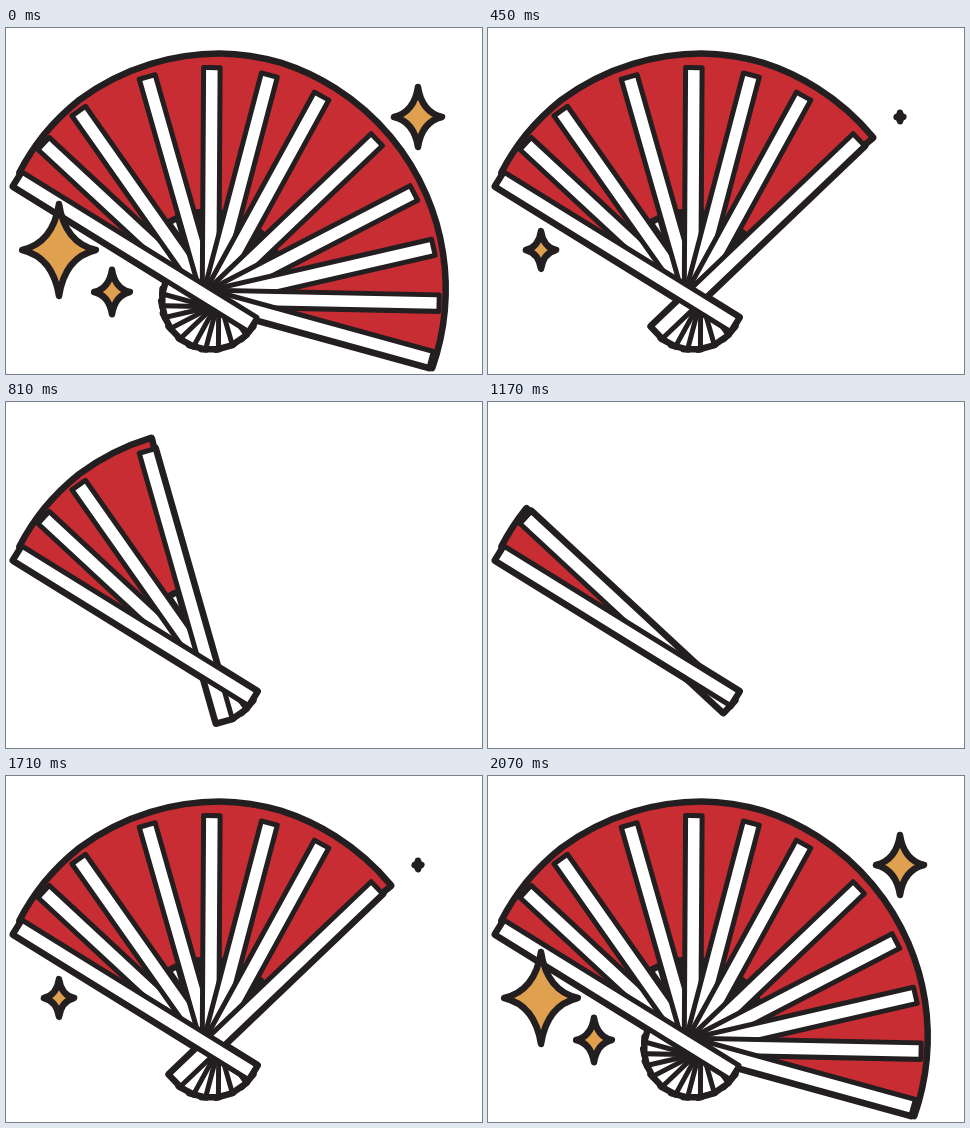
Recreate the animation shown at these times as an HTML page. Size 476 by 346 pixels, loop 2.16 s.

```html
<!DOCTYPE html>
<html lang="en">
<head>
<meta charset="utf-8">
<title>Folding fan</title>
<style>
  html, body { margin: 0; width: 100%; height: 100%; overflow: hidden; background: #fff; }
  svg { display: block; width: 476px; height: 346px; stroke: #231f20; stroke-linejoin: round; }
</style>
</head>
<body>
<svg viewBox="0 0 476 346">
  <defs>
    <g id="fan">
      <path id="cloth" fill="#c82d33"/>
      <g id="sticks" fill="#fff"></g>
    </g>
  </defs>
  <!-- The wider copy behind thickens the silhouette. -->
  <use href="#fan" stroke-width="8"/>
  <use href="#fan" stroke-width="5"/>
  <g id="stars" fill="#dfa04f" stroke-width="6.5"></g>
</svg>
<script>
const STEP = 90, STEPS = 24, STICK_WIDTH = 16.5;

// Direction of each stick in degrees, clockwise from the left.
const headings = [30, 41.5, 54, 74, 91, 106, 120.5, 138.5, 155, 169.5, 183.5, 197.5];

// centre x, y, half height; each star appears one step after the one before
const stars = [[53, 222, 46], [412, 89, 30], [106, 264, 23.5]];
const FIRST_STAR = 7;

const byId = id => document.getElementById(id);

function add(parent, name, attrs = {}) {
  const el = document.createElementNS("http://www.w3.org/2000/svg", name);
  for (const key in attrs) el.setAttribute(key, attrs[key]);
  return byId(parent).appendChild(el);
}

function polar(heading, radius, x = 202, y = 261) {
  const a = heading * Math.PI / 180;
  return [x - radius * Math.cos(a), y - radius * Math.sin(a)];
}

const tip = (h, i) => polar(h, 219.5 + 0.12 * i * i);
const tail = h => polar(h, -48, 205, 272.5);
const clothCorner = (h, i) => polar(h + 1.8, Math.min(237, 221 + 3.5 * i));
const clothInner = h => polar(h, 78);

function addStick(h, i) {
  const [x, y] = tip(h, i), [tailX, tailY] = tail(h);
  const dx = tailX - x, dy = tailY - y;
  const angle = Math.atan2(dy, dx) * 180 / Math.PI;
  return add("sticks", "rect", {
    y: -STICK_WIDTH / 2, width: Math.hypot(dx, dy), height: STICK_WIDTH,
    transform: `translate(${x} ${y}) rotate(${angle})`
  });
}

const stickEls = headings.map(addStick);
byId("sticks").append(stickEls[0]); // the guard stick lies on top
const starEls = stars.map(() => add("stars", "path"));

function clothPath(count) {
  if (count < 2) return "";
  const open = headings.slice(0, count);
  const outer = open.map(clothCorner);
  const inner = open.map(clothInner).reverse();
  return `M${outer.join(" A237 237 0 0 1 ")} L${inner.join(" A78 78 0 0 0 ")}Z`;
}

function starPath(x, y, h) {
  const w = h * 0.8, a = w * 0.16, b = h * 0.16;
  return `M${x} ${y - h}q${a} ${h - b} ${w} ${h}q${a - w} ${b} ${-w} ${h}` +
    `q${-a} ${b - h} ${-w} ${-h}q${w - a} ${-b} ${w} ${-h}Z`;
}

function draw(time) {
  const step = Math.floor(time / STEP) % STEPS;
  const count = Math.min(headings.length, Math.abs(step - STEPS / 2) + 1);
  byId("cloth").setAttribute("d", clothPath(count));
  stickEls.forEach((el, i) => el.setAttribute("visibility", i < count ? "visible" : "hidden"));
  stars.forEach(([x, y, h], i) => {
    const scale = Math.min(1, 0.14 + 0.27 * (count - FIRST_STAR - i));
    starEls[i].setAttribute("d", scale > 0 ? starPath(x, y, h * scale) : "");
  });
}

function tick() {
  draw(performance.now());
  requestAnimationFrame(tick);
}
tick();
</script>
</body>
</html>
```
